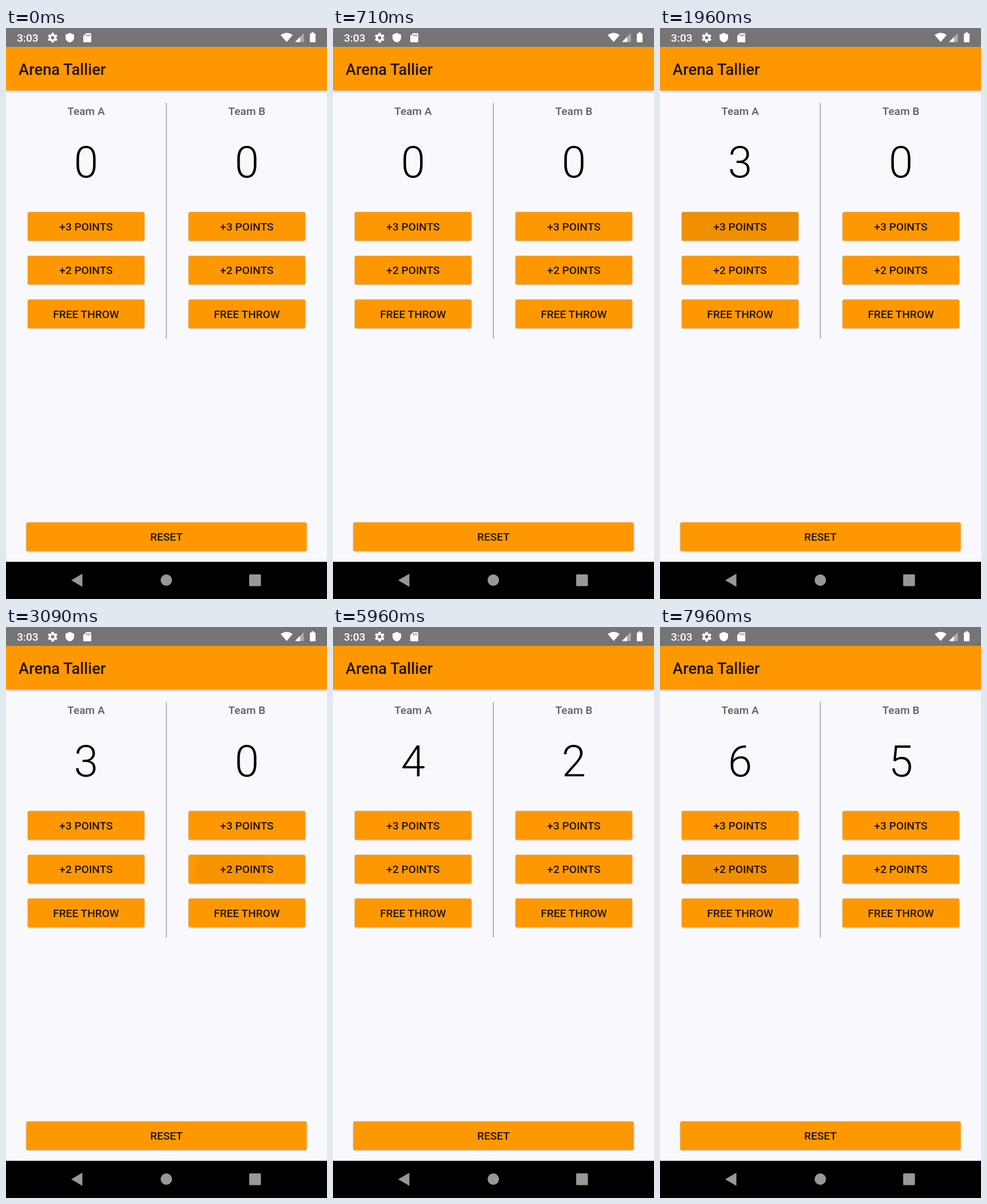
These frames come from a looping animation (561 px wide and 998 px high, 8000 ms). An HTML page:

```html
<!DOCTYPE html>
<html lang="en">
<head>
<meta charset="utf-8">
<title>Arena Tallier</title>
<style>
  html, body { margin: 0; width: 100%; height: 100%; overflow: hidden; background: #f9f9fd; }
  svg { display: block; }
  text { font: 500 19.1px Roboto, sans-serif; fill: #000; fill-opacity: .87; }
  .mid { text-anchor: middle; }
  .title { font-size: 27.3px; }
  .team { fill-opacity: .62; }
  .score { font-size: 76.4px; font-weight: 300; fill-opacity: 1; }
  .clock { fill: #fff; fill-opacity: 1; }
  .bar { filter: drop-shadow(0 2px 1.5px rgba(0, 0, 0, .25)); }
  .key { filter: drop-shadow(0 1.8px 1.2px rgba(0, 0, 0, .33)); }
</style>
</head>
<body>
<svg id="stage" width="100%" height="100%" viewBox="0 0 561 998">
  <rect width="561" height="998" fill="#f9f9fd"/>
  <rect class="bar" y="20" width="561" height="89" fill="#ff9800"/>
  <rect width="561" height="33" fill="#757575"/>
  <text class="title" x="22" y="81.5">Arena Tallier</text>

  <text class="clock" x="19" y="24">3:03</text>
  <g fill="#fff">
    <g id="gear" transform="translate(81.5 17)">
      <circle r="4.6" fill="none" stroke="#fff" stroke-width="3.4"/>
    </g>
    <path d="M111.5 8.5l7.5 3.2v5c0 4.2-3.2 7.4-7.5 8.5-4.300-1.100-7.500-4.300-7.500-8.500v-5z"/>
    <path d="M140 9h7.500q1.500 0 1.500 1.500v13q0 1.500-1.500 1.500h-11q-1.500 0-1.500-1.500v-9.500z"/>
    <path d="M480 12.200Q490.500 4.600 501 12.200L490.500 24.500z"/>
    <path d="M505 24.500L520.500 9v15.500z" opacity=".4"/>
    <path d="M505 24.500L514 15.500v9z"/>
    <path d="M534 7.500h4v2h2q1 0 1 1v13.500q0 1-1 1h-8q-1 0-1-1V10.500q0-1 1-1h2z"/>
  </g>
  <path d="M140.500 11v3.500M143.500 11v3.500M146.500 11v3.500" stroke="#757575" stroke-width="1.400"/>

  <path d="M280.300 131V543" stroke="#999" stroke-width="1.400"/>
  <g id="teams"></g>

  <rect y="933" width="561" height="65" fill="#000"/>
  <g fill="#989898">
    <path d="M114 965.200L133.500 953.700v23z"/>
    <circle cx="280.200" cy="965" r="10"/>
    <rect x="425" y="955" width="20.500" height="20.500" rx="1.500"/>
  </g>
</svg>
<script>
const NS = 'http://www.w3.org/2000/svg';
const LOOP = 8000, KEY_H = 50;
const $ = id => document.getElementById(id);

function add(parent, tag, attrs, text) {
  const el = document.createElementNS(NS, tag);
  for (const k in attrs) el.setAttribute(k, attrs[k]);
  if (text !== undefined) el.textContent = text;
  parent.append(el);
  return el;
}

for (let a = 0; a < 360; a += 60) {
  add($('gear'), 'rect', { x: -2.2, y: -8.5, width: 4.4, height: 4, rx: .6, transform: `rotate(${a})` });
}

function makeKey(x, y, w, label) {
  const g = $('teams');
  add(g, 'rect', { class: 'key', x, y, width: w, height: KEY_H, rx: 2.7, fill: '#ff9800' });
  const clip = add(g, 'svg', { x, y, width: w, height: KEY_H, overflow: 'hidden' });
  const ripple = add(clip, 'circle', { cy: KEY_H / 2, r: 0, 'fill-opacity': 0 });
  add(g, 'text', { class: 'mid', x: x + w / 2, y: y + 32.4 }, label);
  return { ripple, w };
}

function makeTeam(name, x) {
  const mid = x + 102;
  add($('teams'), 'text', { class: 'mid team', x: mid, y: 152 }, name);
  const score = add($('teams'), 'text', { class: 'mid score', x: mid, y: 261 }, 0);
  const keys = {};
  ['FREE THROW', '+2 POINTS', '+3 POINTS'].forEach((label, i) => {
    keys[i + 1] = makeKey(x, 474.5 - i * 76.5, 204, label);
  });
  return { score, keys };
}

const teams = [makeTeam('Team A', 38), makeTeam('Team B', 319)];
makeKey(35.5, 864, 490, 'RESET');

// at: finger down, up: finger lifted, dx: touch offset from the middle
const taps = [
  { team: 0, points: 3, at: 1740, up: 1850, dx: 0 },
  { team: 1, points: 2, at: 3050, up: 3200, dx: -41 },
  { team: 0, points: 1, at: 4530, up: 4640, dx: 0 },
  { team: 1, points: 3, at: 6020, up: 6130, dx: 0 },
  { team: 0, points: 2, at: 7690, up: 7800, dx: 0 }
];

const clamp = v => Math.max(0, Math.min(1, v));

function drawRipple(tap, t) {
  const { ripple, w } = teams[tap.team].keys[tap.points];
  const age = t - tap.at;
  if (age < 0 || age > 900) return;
  const grow = 1 - (1 - clamp(age / 225)) ** 2;
  const fadeFrom = Math.max(tap.at + 300, tap.up + 120);
  const alpha = clamp(age / 75) * (1 - clamp((t - fadeFrom) / 220));
  ripple.setAttribute('cx', w / 2 + tap.dx * (1 - grow));
  ripple.setAttribute('r', 40 + 66 * grow);
  ripple.setAttribute('fill-opacity', .06 * alpha);
}

function draw(t) {
  const totals = [0, 0];
  for (const team of teams) {
    for (const k in team.keys) team.keys[k].ripple.setAttribute('fill-opacity', 0);
  }
  for (const tap of taps) {
    if (t >= tap.up) totals[tap.team] += tap.points;
    drawRipple(tap, t);
  }
  teams.forEach((team, i) => { team.score.textContent = totals[i]; });
}

const start = performance.now();
function tick() {
  draw((performance.now() - start) % LOOP);
  requestAnimationFrame(tick);
}
tick();
</script>
</body>
</html>
```
